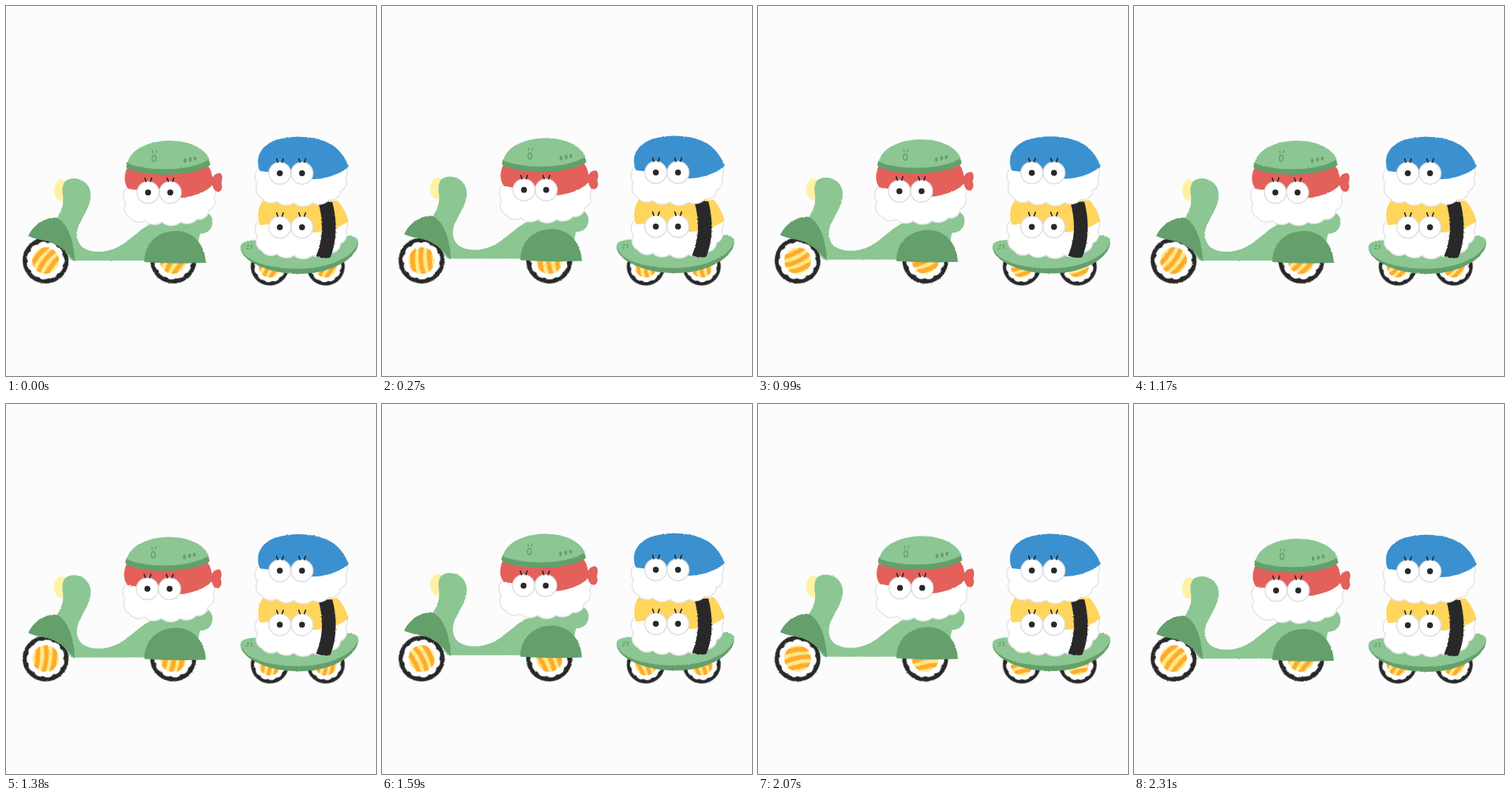
These frames come from a looping animation (500 px wide and 500 px high, 2340 ms). An HTML page:

```html
<!DOCTYPE html>
<html lang="en">
<head>
<meta charset="utf-8">
<title>Sushi ride</title>
<style>
  html, body { margin: 0; width: 100%; height: 100%; overflow: hidden; background: #fcfcfc; }
  svg { display: block; width: 100vw; height: 100vh; }
  .fuzzy { filter: url(#fuzz); }
  .light { fill: #8bc693; }
  .dark { fill: #649f6c; }
  .ink { fill: #282828; }
  .rice { fill: #fff; stroke: #e5e5e5; stroke-width: 1.6; }
  .line { fill: none; stroke: #282828; stroke-width: 1.8; stroke-linecap: round; }
  .mark { fill: none; stroke: #649f6c; stroke-width: 1.5; stroke-linecap: round; }
  .stripe { fill: none; stroke: #ffab2b; stroke-width: 6.4; }
</style>
</head>
<body>
<svg id="stage" viewBox="0 0 500 500">
  <defs>
    <filter id="fuzz" x="-10%" y="-10%" width="120%" height="120%" color-interpolation-filters="sRGB">
      <feTurbulence type="fractalNoise" baseFrequency=".5" numOctaves="1" seed="4"/>
      <feDisplacementMap in="SourceGraphic" scale="2.4" xChannelSelector="R" yChannelSelector="G"/>
    </filter>
    <clipPath id="core"><circle r="18"/></clipPath>

    <g id="eye">
      <circle r="14.8" fill="#fff" stroke="#dedede" stroke-width="1.5"/>
      <circle r="4" class="ink"/>
      <path class="line" d="M-4.300-19.500l1.600 4.500M4.800-19.500l-1.600 4.500"/>
    </g>
    <g id="eyes"><use href="#eye" x="370" y="226"/><use href="#eye" x="400" y="226"/></g>
    <path id="rice" class="rice" d="M342 219A15 15 0 0 0 340 240A14 14 0 0 0 346 260
      A15 15 0 0 0 366 264A18 18 0 0 0 389 266A19 19 0 0 0 414 266A18 18 0 0 0 436 262
      A13 13 0 0 0 452 250A13 13 0 0 0 459 232Q464 224 459 217Q400 190 342 219Z"/>
    <g id="wheel">
      <g class="fuzzy">
        <circle r="31" class="ink"/>
        <path id="lumps" fill="#fff"/>
        <g clip-path="url(#core)">
          <circle r="18" fill="#ffe98c"/>
          <path class="stripe" d="M-20-9Q-6-15 20-10M-20 3Q-2-4 20 1M-20 14Q0 8 20 12"/>
        </g>
      </g>
    </g>
  </defs>

  <g class="wheel" data-at="53.5 344 1"></g>
  <g class="wheel" data-at="226 344 1"></g>
  <g class="wheel" data-at="356.5 352 .83"></g>
  <g class="wheel" data-at="432 352 .83"></g>

  <g class="bob" data-rise="5.6">
    <g class="fuzzy">
      <ellipse cx="75" cy="249" rx="10" ry="14.5" fill="#fdf2a4"/>
      <path class="light" d="M79 238C87 229 107 232 113 247C119 264 106 280 98 297C93 311 97 322 105 327
        C119 336 144 333 162 319C178 307 186 297 205 291L262 278C275 277 280 285 279 293
        C278 303 272 307 262 308L255 344H88L60 300C69 285 79 276 77 257Q75 245 79 238Z"/>
      <path class="dark" d="M30 311C36 297 51 286 67 286C82 290 93 318 93 346C87 338 77 326 60 319C49 316 39 315 30 311Z"/>
      <path class="dark" d="M187 346C187 318 208 304 229 304C253 304 269 322 270 347Q228 349 187 346Z"/>
    </g>
  </g>

  <g class="bob" data-rise="8" data-sway="1">
    <use href="#rice" x="-178" y="26"/>
    <path class="fuzzy" fill="#e3605b" d="M163 220Q157 236 165 247Q190 250 210 257Q232 262 250 257Q270 252 279 242
      Q281 252 288 251Q294 248 291 239Q294 230 290 226Q283 225 279 232Q278 220 270 213Q210 205 163 220Z"/>
    <use href="#eyes" x="-178" y="26"/>
    <g class="fuzzy">
      <path class="dark" d="M164 210Q162 214 163 219C185 231 250 232 276 215Q276 210 273 206Z"/>
      <path class="light" d="M164 212C169 191 198 182 221 182C245 182 267 190 275 207C250 224 190 224 164 212Z"/>
    </g>
    <ellipse class="mark" cx="200" cy="206" rx="2.5" ry="4.2"/>
    <path class="mark" d="M198 196l.6 2.5M203.500 195.500l-.6 2.500"/>
    <g class="dark">
      <ellipse cx="242" cy="209" rx="1.9" ry="3.100"/>
      <ellipse cx="249" cy="207.500" rx="1.9" ry="3"/>
      <ellipse cx="255.500" cy="206" rx="1.9" ry="2.800"/>
    </g>
  </g>

  <g class="bob" data-rise="2.2">
    <g class="fuzzy">
      <path class="dark" d="M317 326C317 346 358 362 395 362C440 362 476 341 476 319Z"/>
      <path class="light" d="M317 326C317 317 329 317 345 316L455 312C468 308 476 312 476 319C471 340 434 355 395 355C358 355 321 346 317 326Z"/>
    </g>
    <path class="mark" d="M326 324.500l2.500-.8M325 328l2.500-.3M332 323v5"/>
  </g>

  <g class="bob" data-rise="2.5">
    <use href="#rice" y="71"/>
    <path class="fuzzy" fill="#ffd55c" d="M343 296Q337 277 347 263H448Q458 273 463 291Q440 306 414 306Q390 298 370 294Z"/>
    <path class="ink fuzzy" d="M422 265L441 265C448 290 447 320 438 340Q428 342 419 338C429 315 429 290 422 265Z"/>
    <use href="#eyes" y="73"/>
    <use href="#rice"/>
    <path class="fuzzy" fill="#3b91cf" d="M343 223C337 208 341 191 362 182C392 172 427 177 444 190
      C455 199 460 209 463 218C447 229 430 234 414 234Q390 226 370 226Z"/>
    <use href="#eyes"/>
  </g>
</svg>
<script>
  const LOOP = 2340, TAU = 2 * Math.PI;
  const all = selector => [...document.querySelectorAll(selector)];

  // Lumpy rice ring inside each wheel
  const lumps = Array.from({ length: 11 }, (_, i) => {
    const a = i * TAU / 11;
    return `${(23.8 * Math.cos(a)).toFixed(2)} ${(23.8 * Math.sin(a)).toFixed(2)}`;
  });
  document.getElementById('lumps').setAttribute('d',
    `M${lumps[0]}` + [...lumps.slice(1), lumps[0]].map(p => `A9 9 0 0 1 ${p}`).join('') + 'Z');

  const wheels = all('.wheel').map(node => {
    node.innerHTML = '<use href="#wheel"/>';
    const [x, y, size] = node.dataset.at.split(' ');
    return { node, place: `translate(${x} ${y}) scale(${size})` };
  });
  const riders = all('.bob').map(node => ({ node, rise: +node.dataset.rise, sway: +(node.dataset.sway || 0) }));

  const swell = turns => (1 - Math.cos(TAU * turns)) / 2;

  function draw(now) {
    const p = now % LOOP / LOOP;
    for (const { node, place } of wheels)
      node.setAttribute('transform', `${place} rotate(${-50 - 360 * p})`);
    for (const { node, rise, sway } of riders)
      node.setAttribute('transform', `translate(${-sway * swell(p)} ${-rise * swell(2 * p)})`);
    requestAnimationFrame(draw);
  }
  draw(performance.now());
</script>
</body>
</html>
```
